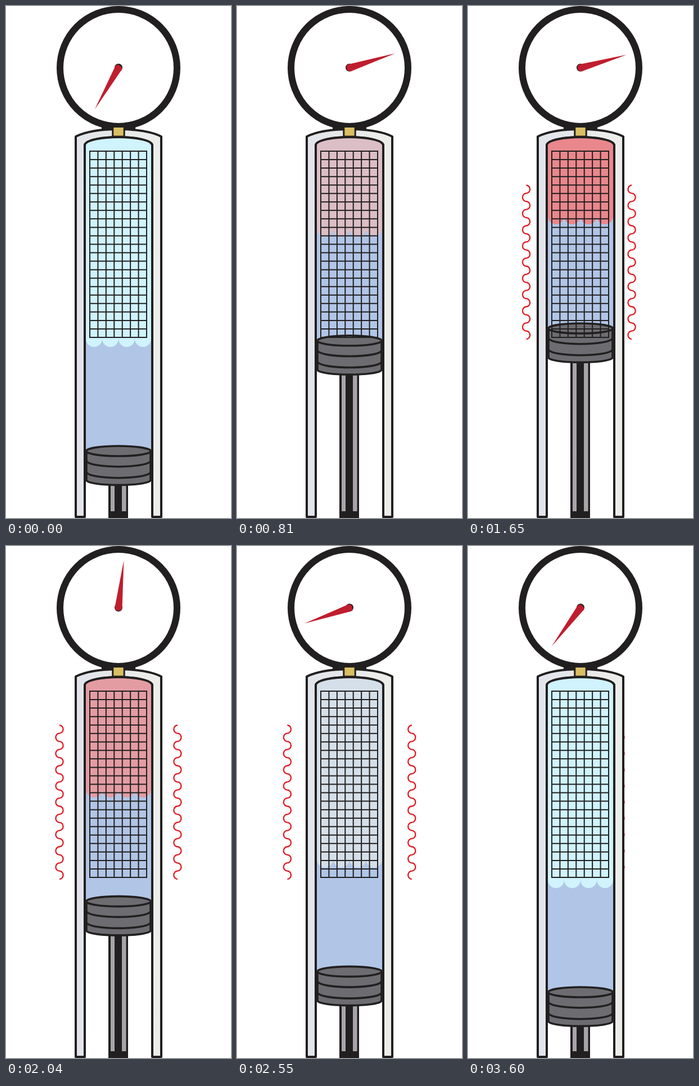
An HTML page that plays this animation: 400x910 px, repeating every 4.6 s.

```html
<!DOCTYPE html>
<html lang="en">
<head>
<meta charset="utf-8">
<title>Piston and gauge</title>
<style>
html, body { margin: 0; width: 100%; height: 100%; overflow: hidden; background: #fff; }
svg { display: block; width: 400px; height: 910px; }
</style>
</head>
<body>
<svg viewBox="0 0 400 910" fill="none" stroke="#211f1f">
  <defs>
    <linearGradient id="wall" gradientUnits="userSpaceOnUse" x1="124" y1="0" x2="276" y2="0">
      <stop offset="0" stop-color="#e1e4ea"/>
      <stop offset="1" stop-color="#edeeea"/>
    </linearGradient>
    <linearGradient id="steel" x1="0" y1="0" x2="1" y2="0">
      <stop offset="0" stop-color="#a5a0a5"/>
      <stop offset="1" stop-color="#a9a9ae"/>
    </linearGradient>
    <clipPath id="bore"><path d="M140 910V247C142 238 172 233 200 233S258 238 260 247V910Z"/></clipPath>
  </defs>
  <g id="waves" stroke="#e31b23" stroke-width="2.3">
    <path id="waveL"/>
    <path id="waveR"/>
  </g>
  <path fill="url(#wall)" stroke-width="4" stroke-linejoin="round"
    d="M124 908V232Q150 219 200 219T276 232V908H260V247C258 238 228 233 200 233S142 238 140 247V908Z"/>
  <g clip-path="url(#bore)" stroke="none">
    <path id="liquid" fill="#b1c5e6"/>
    <path id="gas"/>
  </g>
  <path id="rod" fill="#211f1f" stroke="none"/>
  <path id="stripL" fill="url(#steel)" stroke="none"/>
  <path id="stripR" fill="url(#steel)" stroke="none"/>
  <g id="piston" stroke-width="3.6">
    <path fill="#6d6c71" d="M143 0V52C148 63 252 63 257 52V0Z"/>
    <path d="M143 18C152 31 248 31 257 18M143 38C152 51 248 51 257 38"/>
    <ellipse cx="200" rx="57.3" ry="9" fill="#6d6c71"/>
  </g>
  <path stroke-width="4" d="M140 908V247C142 238 172 233 200 233S258 238 260 247V908"/>
  <path id="grid" stroke-width="2" stroke-linecap="square"/>
  <circle cx="200" cy="110" r="104" stroke-width="12" fill="#fff"/>
  <path fill="#211f1f" stroke="none" d="M170 214H230V219H170Z"/>
  <rect x="189.8" y="214.5" width="20.4" height="17.5" fill="#d9be62" stroke-width="3"/>
  <circle cx="200" cy="109.5" r="7" fill="#211f1f" stroke="none"/>
  <path id="needle" fill="#bf1e2e" stroke="none" d="M0-85L-6.5-1Q-6.5 5 0 5T6.5-1Z"/>
</svg>
<script>
const STEP = 30, LAST = 3600, LOOP = 4600;
const el = id => document.getElementById(id);
const set = (id, name, value) => el(id).setAttribute(name, value);

// Linear interpolation through [time, value] points
function track(points, t) {
  let [t0, v0] = points[0];
  for (const [t1, v1] of points) {
    if (t <= t1) return t1 > t0 ? v0 + (v1 - v0) * (t - t0) / (t1 - t0) : v1;
    [t0, v0] = [t1, v1];
  }
  return v0;
}

const PISTON = [[0, 791], [900, 573], [1800, 573], [2700, 793]];
const HEAT = [[0, 0], [1800, 1], [2700, 0]];
const NEEDLE = [[0, -150.2], [450, 71.6], [1740, 74.3], [2700, -143.1]];
const LEFT = [[900, 120], [2100, 93.7], [2700, 88], [3600, 140]];
const RIGHT = [[900, 264.5], [2100, 307], [2700, 312], [3600, 271]];
const COLD = [208, 243, 254], HOT = [235, 125, 130];

function wave(sweep) {
  let d = "M0 318.5";
  for (let i = 0; i < 19; i++) d += `a6.6 7.2 0 0 ${(i + sweep) % 2} 0 14.4`;
  return d;
}

function grid() {
  let d = "";
  for (let i = 0; i <= 7; i++) d += `M${149 + i * 101 / 7} 258V589`;
  for (let i = 0; i <= 22; i++) d += `M149 ${258 + i * 331 / 22}H250`;
  return d;
}

function draw(t) {
  const p = track(PISTON, t), heat = track(HEAT, t);
  const edge = p - 199.5;
  const rgb = COLD.map((c, i) => Math.round(c + (HOT[i] - c) * heat));
  set("piston", "transform", `translate(0 ${p})`);
  set("liquid", "d", `M140 ${edge - 5}H260V${p}H140Z`);
  set("gas", "d", `M140 230H260V${edge}H258` + "a14.5 14.5 0 0 1-29 0".repeat(4) + "H140Z");
  set("gas", "fill", `rgb(${rgb})`);
  set("rod", "d", `M182 ${p + 50}H217V910H182Z`);
  set("stripL", "d", `M186 ${p + 50}H193V898H186Z`);
  set("stripR", "d", `M206 ${p + 50}H213.5V898H206Z`);
  set("needle", "transform", `translate(200 110) rotate(${track(NEEDLE, t)})`);
  set("waves", "visibility", t < 900 ? "hidden" : "visible");
  set("waveL", "transform", `translate(${track(LEFT, t)} 0)`);
  set("waveR", "transform", `translate(${track(RIGHT, t)} 0)`);
}

set("waveL", "d", wave(1));
set("waveR", "d", wave(0));
set("grid", "d", grid());

const start = performance.now();
function tick() {
  const t = (performance.now() - start) % LOOP;
  draw(Math.min(LAST, Math.floor(t / STEP) * STEP));
  requestAnimationFrame(tick);
}
draw(0);
requestAnimationFrame(tick);
</script>
</body>
</html>
```
